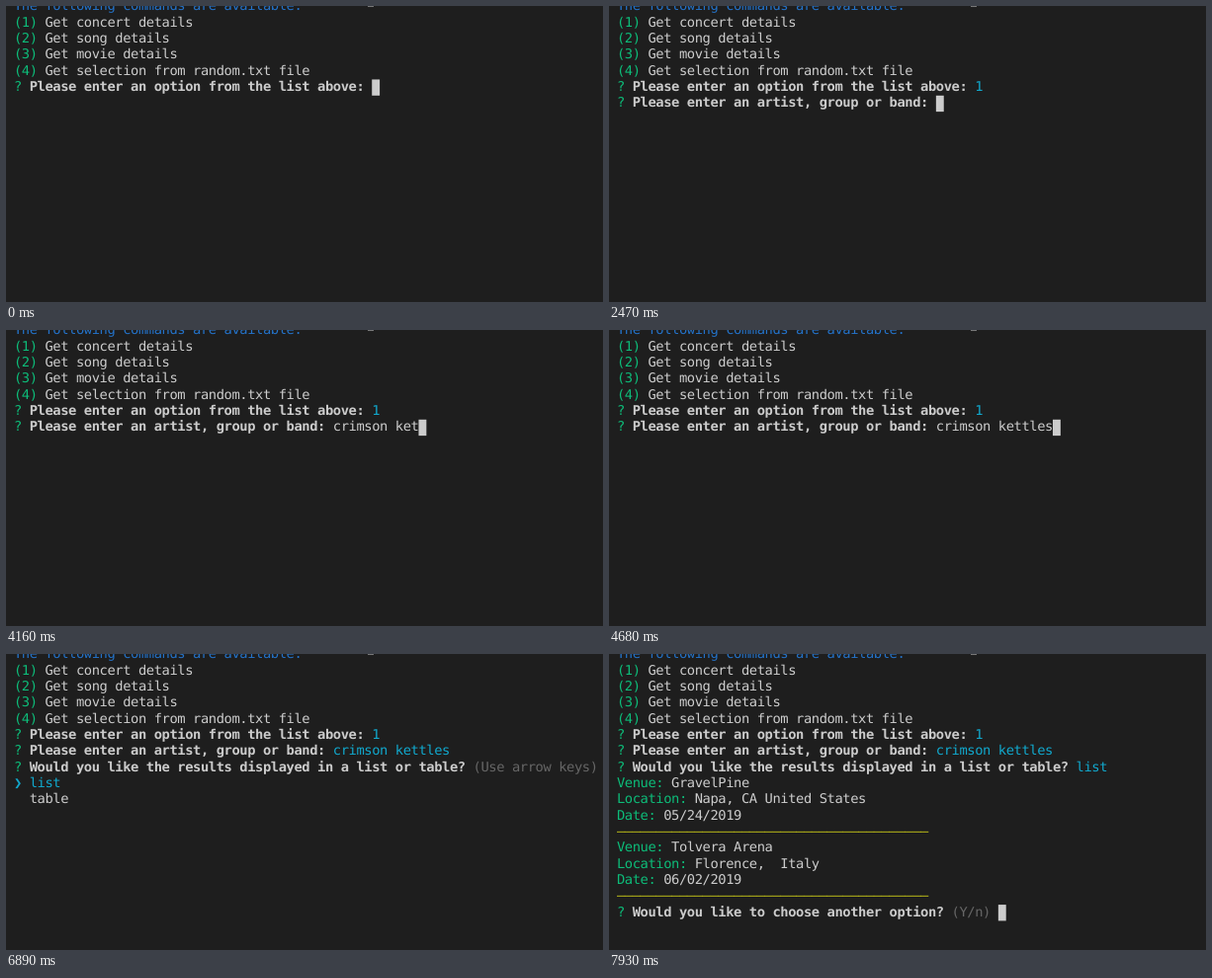
Recreate the animation shown at these times as an HTML page. Size 604 by 300 pixels, loop 8000 ms.

```html
<!DOCTYPE html>
<html lang="en">
<head>
<meta charset="utf-8">
<title>Terminal</title>
<style>
  html, body { margin: 0; width: 100%; height: 100%; overflow: hidden; background: #1e1e1e; }
  /* A terminal grid of 8 x 17 cells, shown slightly reduced. */
  #term {
    position: absolute; left: 8px; top: 0;
    transform: translateY(-7.2px) scale(.9843, .9606); transform-origin: 0 0;
    font: 14px/17px "DejaVu Sans Mono", monospace;
    letter-spacing: calc(8px - 1ch);
    text-rendering: geometricPrecision;
    font-variant-ligatures: none;
    color: #ccc; white-space: pre;
  }
  .row { height: 17px; }
  b { font-weight: 700; }
  .blue { color: #2472c8; }
  .green { color: #0dbc79; }
  .cyan { color: #11a8cd; }
  .gray { color: #666; }
  .yellow { color: #c3c318; }
  .cursor, .arrow { display: inline-block; width: 8px; height: 17px; vertical-align: top; }
  .cursor { background: #ccc; }
  #pointer { position: absolute; left: 366px; top: 0; width: 6px; height: 1px; background: #777; }
</style>
</head>
<body>
<div id="term"></div>
<div id="pointer"></div>
<script>
const LOOP = 8000, STEP = 130;
const BAND = "crimson kettles";
const AT = { digit: 1040, option: 1430, typing: 2730, band: 5850, layout: 7540, results: 7930 };

const term = document.getElementById("term");
const paint = (color, text) => `<span class="${color}">${text}</span>`;
const cursor = '<span class="cursor"></span>';
const ask = (text, rest) => `${paint("green", "?")} <b>${text}</b> ${rest}`;
const field = (name, value) => `${paint("green", name + ":")} ${value}`;
const rule = paint("yellow", "—".repeat(40));

const menu = [
  paint("blue", "The following commands are available:"),
  ...["Get concert details", "Get song details", "Get movie details",
    "Get selection from random.txt file"].map((s, i) => `${paint("green", `(${i + 1})`)} ${s}`)
];

const concert = (venue, place, date) =>
  [field("Venue", venue), field("Location", place), field("Date", date), rule];

function screen(t) {
  const rows = [...menu];
  const option = t >= AT.option ? paint("cyan", "1") : (t >= AT.digit ? "1" : "") + cursor;
  rows.push(ask("Please enter an option from the list above:", option));
  if (t < AT.option) return rows;

  const typed = BAND.slice(0, Math.max(0, Math.floor((t - AT.typing) / STEP)));
  rows.push(ask("Please enter an artist, group or band:",
    t >= AT.band ? paint("cyan", BAND) : typed + cursor));
  if (t < AT.band) return rows;

  const done = t >= AT.layout;
  rows.push(ask("Would you like the results displayed in a list or table?",
    done ? paint("cyan", "list") : paint("gray", "(Use arrow keys)")));
  if (!done) {
    rows.push(paint("cyan", '<span class="arrow">❯</span> list'), "  table");
  } else if (t < AT.results) {
    rows.push(cursor);
  } else {
    rows.push(
      ...concert("GravelPine", "Napa, CA United States", "05/24/2019"),
      ...concert("Tolvera Arena", "Florence,  Italy", "06/02/2019"),
      ask("Would you like to choose another option?", paint("gray", "(Y/n)") + " " + cursor));
  }
  return rows;
}

let shown = "";
function draw() {
  const html = screen(performance.now() % LOOP).map(r => `<div class="row">${r}</div>`).join("");
  if (html !== shown) term.innerHTML = shown = html;
  requestAnimationFrame(draw);
}
draw();
</script>
</body>
</html>
```
